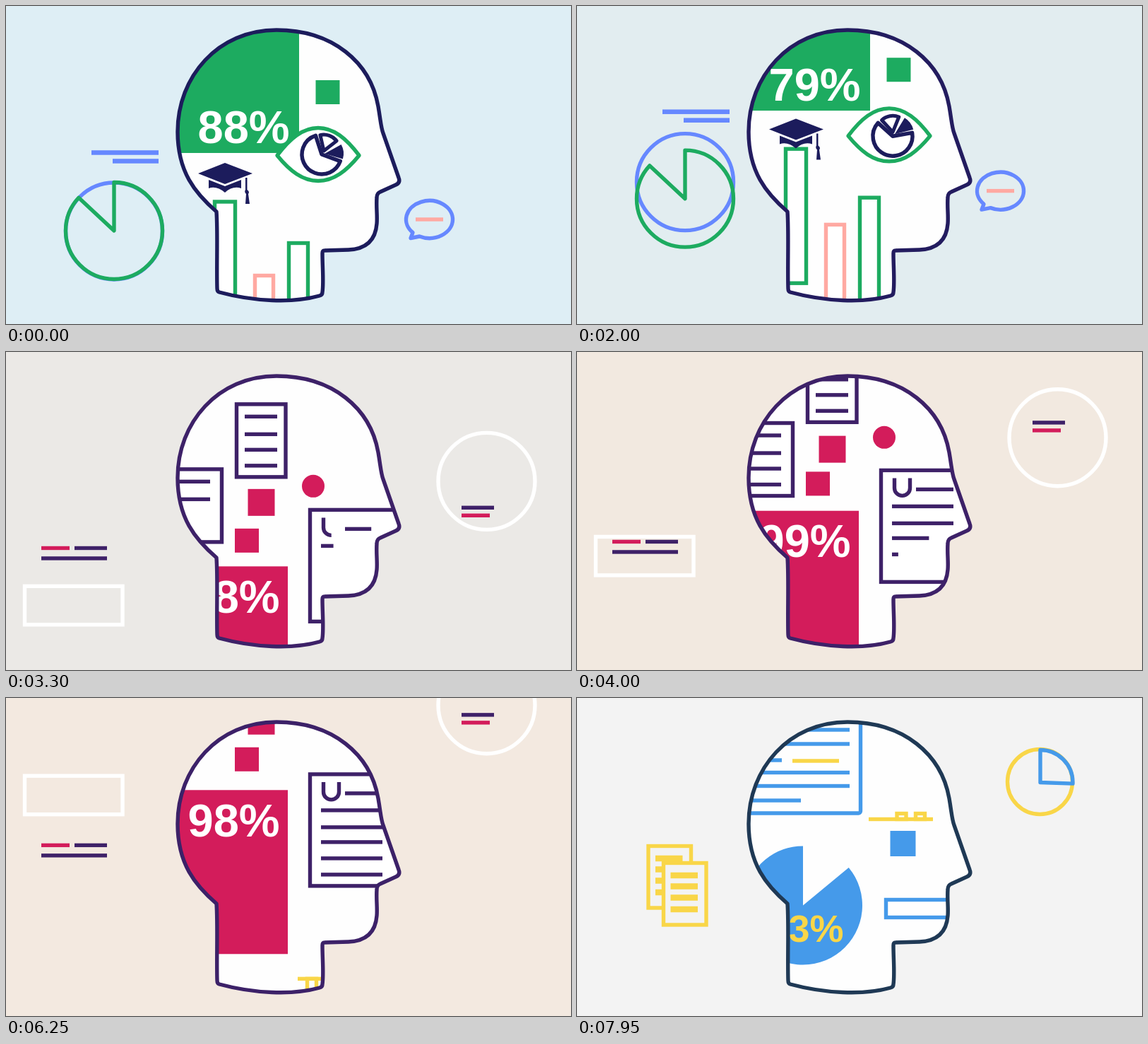
These frames come from a looping animation (800x450 px, 8000 ms). An HTML page with a canvas:

```html
<!DOCTYPE html>
<html lang="en">
<head>
<meta charset="utf-8">
<title>Head full of data</title>
<style>
  html, body { margin: 0; height: 100%; overflow: hidden; }
  canvas { display: block; width: 100vw; height: 100vh; }
</style>
</head>
<body>
<canvas width="800" height="450"></canvas>
<script>
const ctx = document.querySelector('canvas').getContext('2d');
const LOOP = 8000, WEIGHT = 5.4;
const GREEN = '#1dab60', NAVY = '#1c1c5c', SKY = '#6688ff', PINK = '#ffa9a2';
const CRIMSON = '#d31c5b', PURPLE = '#3e2168', BLUE = '#459aea', YELLOW = '#f9d648', WHITE = '#fff';
const rad = degrees => degrees * Math.PI / 180;
const clamp = v => Math.max(0, Math.min(1, v));
const ramp = (t, start, length) => clamp((t - start) / length);

// Monotone cubic interpolation through (times, values).
function track(times, values) {
  const slope = times.slice(1).map((x, i) => (values[i + 1] - values[i]) / (x - times[i]));
  const tangent = times.map((_, i) => {
    const a = slope[i - 1] ?? slope[i], b = slope[i] ?? slope[i - 1];
    return a * b > 0 ? 2 * a * b / (a + b) : 0;
  });
  return t => {
    const last = times.length - 1;
    if (t <= times[0]) return values[0];
    if (t >= times[last]) return values[last];
    const i = times.findIndex(x => x > t) - 1;
    const h = times[i + 1] - times[i], u = (t - times[i]) / h, v = 1 - u;
    return v * v * ((1 + 2 * u) * values[i] + u * h * tangent[i])
         + u * u * ((3 - 2 * u) * values[i + 1] - v * h * tangent[i + 1]);
  };
}

// Vertical motion of the three scenes: drift and leave, arrive-drift-leave, arrive.
const leaving = (a, b, c) =>
  track([0, 1100, 1750, 2600, 3300], [a, b, b + (b - a) * .59, c, c - 300]);
const passing = (a, b, c, d) =>
  track([1750, 2600, 3300, 4250, 4900, 5950, 6250, 6800, 7400],
        [a + 350, a, b, c + 12, c, c - 19, d, d - 170, d - 420]);
const arriving = (y, d) =>
  track([5950, 6250, 6850, 7500, 7950], [1.25, 1, .6, .15, 0].map(k => y + k * d));

const first = {
  tile: leaving(208, 187, 0), badge: leaving(122, 111, 0), eye: leaving(209.5, 202, 78),
  icon: leaving(210, 202, 97), cap: leaving(0, -21.5, -220), pie: leaving(318, 303, 145),
  ring: leaving(318.5, 303.5, -2), lines: leaving(207.5, 192, -40), bubble: leaving(302, 294.5, 86),
  bars: [
    { x: 295.5, w: 29, h: 190, color: GREEN, y: leaving(277, 256, -22) },
    { x: 352.5, w: 26, h: 160, color: PINK, y: leaving(381.5, 372, -2) },
    { x: 400.5, w: 27, h: 200, color: GREEN, y: leaving(335.5, 316.5, 81) }
  ],
  value: track([1750, 2500, 3100], [88, 60, 20])
};
const second = {
  sheet: passing(317, 73, -29, -120), sideSheet: passing(364.5, 166, 77.5, -60),
  news: passing(403, 223.5, 145.5, 108), video: passing(440, 213, 113.5, 33),
  badge: passing(440, 267, 161, 87), bird: passing(360, 190, 97, 10),
  tile: passing(470, 303.5, 199.5, 130.5), circle: passing(358.5, 183, 98.5, 10.5),
  frame: passing(490, 358.5, 264, 137.5), lines: passing(370, 277.5, 253.5, 208.5),
  pair: passing(480, 220.5, 70, 24),
  value: track([2600, 3300, 3900, 5950, 6250, 6900], [70, 88.5, 99, 99, 98.5, 60])
};
const third = {
  chart: arriving(171.5, 226), badge: arriving(206, 240), label: arriving(298, 200),
  page: arriving(163, 410), pie: arriving(293.5, 300), sheets: arriving(0, 300),
  ring: arriving(118.5, 420)
};
const channels = (times, colors) =>
  [0, 1, 2].map(i => track(times, colors.map(c => c[i])));
const background = channels([1300, 2600, 3300, 4600, 6250, 7700],
  [[222, 238, 245], [230, 236, 235], [235, 233, 230], [245, 233, 221], [243, 233, 224], [243, 243, 243]]);
const outline = channels([1300, 2600, 3300, 6250, 7700],
  [[28, 28, 92], [42, 29, 98], [61, 33, 104], [60, 33, 104], [31, 57, 85]]);
const colorAt = (channel, t) => `rgb(${channel.map(f => Math.round(f(t)))})`;

const HEAD = new Path2D(`M383 34C463 34 516 80 527 142C531 166 531 172 534 180L556 243Q559 250 552 253
  L530 263Q525 265 525 271C524 285 526 297 525 308C523 335 506 344 485 345L451 346Q448 346 448 350
  C448 370 450 390 448 405Q448 409 444 410C405 421 350 418 302 405Q299 404 299 400
  C298 370 300 320 298 291C268 265 243 235 243 178C243 100 300 34 383 34Z`);
const EYE = new Path2D('M-58 2C-40-22-22-37 0-37S40-22 58 2C40 24 22 38 0 38S-40 24-58 2Z');
const CAP = new Path2D(`M272 237L310 222L349 237L310 252Z
  M287 246L310 255L333 246V258Q321 254 310 264Q298 254 287 258Z
  M339 243h2.5v17q4 3 1.5 6l2 14h-6l1-14q-3-3-1-6Z`);
const BUBBLE = new Path2D('M-26.5 26.5L-23.5 18.6A33 26.5 0 1 1-14 24Z');

function stroke(color, path, width = WEIGHT) {
  ctx.strokeStyle = color;
  ctx.lineWidth = width;
  path ? ctx.stroke(path) : ctx.stroke();
}
function at(x, y, draw, angle = 0) {
  ctx.save();
  ctx.translate(x, y);
  ctx.rotate(angle);
  draw();
  ctx.restore();
}
function rect(x, y, w, h, color) {
  ctx.fillStyle = color;
  ctx.fillRect(x, y, w, h);
}
function square(x, y, size, color) {
  rect(x - size / 2, y - size / 2, size, size, color);
}
function box(x, y, w, h, color, fill) {
  if (fill) rect(x, y, w, h, fill);
  ctx.lineJoin = 'miter';
  ctx.strokeStyle = color;
  ctx.lineWidth = WEIGHT;
  ctx.strokeRect(x, y, w, h);
  ctx.lineJoin = 'round';
}
function line(x1, x2, y, color, progress = 1, width = WEIGHT) {
  rect(x1, y - width / 2, (x2 - x1) * progress, width, color);
}
function circle(x, y, r) {
  ctx.beginPath();
  ctx.arc(x, y, r, 0, 2 * Math.PI);
}
function sector(x, y, r, from, to) {
  ctx.beginPath();
  ctx.moveTo(x, y);
  ctx.arc(x, y, r, rad(from), rad(to));
  ctx.closePath();
}
function percent(value, x, y, size, color) {
  ctx.font = `bold ${size}px "Liberation Sans", Arial, sans-serif`;
  ctx.fillStyle = color;
  ctx.fillText(Math.floor(value) + '%', x, y);
}

function pieIcon() {
  sector(0, 0, 28, 20, 252);
  stroke(NAVY, null, 5.5);
  sector(3, -5, 23, -103, -38);
  stroke(NAVY, null, 5);
  sector(4, -1, 27, -29, 16);
  ctx.fillStyle = NAVY;
  ctx.fill();
}

function firstInside(t) {
  const tile = first.tile(t), eye = first.eye(t);
  rect(230, tile - 260, 185, 260, GREEN);
  percent(first.value(t), 271.5, tile - 14, 65, WHITE);
  square(455.5, first.badge(t), 34, GREEN);
  for (const bar of first.bars) box(bar.x, bar.y(t), bar.w, bar.h, bar.color, WHITE);
  at(0, first.cap(t), () => {
    ctx.fillStyle = NAVY;
    ctx.fill(CAP);
  });
  at(442, eye, () => {
    ctx.fillStyle = WHITE;
    ctx.fill(EYE);
    stroke(GREEN, EYE);
  });
  at(447, first.icon(t), pieIcon, rad(t * .165));
}

function firstOutside(t) {
  const y = first.lines(t), bubble = first.bubble(t);
  line(121, 216, y, SKY, 1, 6.5);
  line(151, 216, y + 12, SKY, 1, 6.5);
  circle(153, first.ring(t), 68.5);
  stroke(SKY);
  sector(153, first.pie(t), 68.5, -90, 223);
  stroke(GREEN);
  at(599.5, bubble, () => stroke(SKY, BUBBLE));
  line(580, 619, bubble, PINK);
}

function secondInside(t) {
  const side = second.sideSheet(t), sheet = second.sheet(t), news = second.news(t), tile = second.tile(t);
  box(200, side, 105.5, 103, PURPLE, WHITE);
  [17.5, 42.5, 64.5, 87].forEach((dy, i) =>
    line(210, 289, side + dy, PURPLE, ramp(t, 2200 + 400 * i, 600)));
  box(326.5, sheet + 1, 69.5, 103, PURPLE, WHITE);
  [18.5, 43.5, 65.5, 88].forEach((dy, i) =>
    line(338, 384, sheet + dy, PURPLE, ramp(t, 2380 + 220 * i, 220)));

  rect(200, tile, 199, 232, CRIMSON);
  percent(second.value(t), 257.5, tile + 65.5, 65, WHITE);
  square(361.5, second.video(t), 38, CRIMSON);
  square(341, second.badge(t), 34, CRIMSON);
  circle(435, second.bird(t), 16);
  ctx.fillStyle = CRIMSON;
  ctx.fill();

  box(430.5, news, 145, 158, PURPLE, WHITE);
  [27, 51, 75, 96, 119, 142].forEach((dy, i) =>
    line(i ? 446 : 480, 533, news + dy, PURPLE, ramp(t, 2950 + 250 * i, 500)));
  const drawn = ramp(t, 2950, 700);
  if (drawn) {
    ctx.beginPath();
    ctx.moveTo(449.5, news + 11);
    ctx.lineTo(449.5, news + 25);
    ctx.arc(460.5, news + 25, 11, Math.PI, 0, true);
    ctx.lineTo(471.5, news + 11);
    ctx.setLineDash([62.6 * drawn, 100]);
    stroke(PURPLE);
    ctx.setLineDash([]);
  }
}

function secondOutside(t) {
  const lines = second.lines(t), pair = second.pair(t);
  circle(680.5, second.circle(t), 68.5);
  stroke(WHITE);
  box(26.5, second.frame(t) - 27, 138.5, 54.5, WHITE);
  line(50, 90, lines, CRIMSON);
  line(97, 143, lines, PURPLE);
  line(50, 143, lines + 14.5, PURPLE);
  line(645, 691, pair, PURPLE);
  line(645, 685, pair + 11, CRIMSON);
}

function thirdInside(t) {
  const page = third.page(t), chart = third.chart(t), pie = third.pie(t);
  ctx.beginPath();
  ctx.roundRect(150, page - 150, 251.5, 150, 3);
  stroke(BLUE);
  for (const [dy, end] of [[118, 386], [98, 386], [75, 290], [57.5, 386], [38.5, 386], [18, 317]])
    line(220, end, page - dy, BLUE);
  line(305, 371, page - 74, YELLOW);

  const value = 83 * ramp(t, 6500, 1350);
  sector(320, pie, 84, -90 - value * 3.73, -90);
  ctx.fillStyle = BLUE;
  ctx.fill();
  percent(value, 269.5, pie + 51, 54, YELLOW);

  const rise = ramp(t, 6250, 1600);
  line(413, 504, chart, YELLOW);
  [0, 8, 8].forEach((height, i) => {
    const h = -30 + (30 + height) * rise;
    if (Math.abs(h) > 2) box(426.5 + 26.5 * i, chart, 13, -h, YELLOW);
  });
  square(461.5, third.badge(t), 36, BLUE);
  box(437.5, third.label(t) - 12.5, 120, 25, BLUE);
}

function thirdOutside(t, paper) {
  at(0, third.sheets(t), () => {
    for (const [x, y] of [[101, 209.5], [122.5, 233.5]]) {
      box(x, y, 60.5, 87.5, YELLOW, paper);
      [17.5, 33, 49, 65.5].forEach(dy => line(x + 10, x + 48.5, y + dy, YELLOW, 1, 8.5));
    }
  });
  const y = third.ring(t);
  circle(655.5, y, 46);
  stroke(YELLOW);
  sector(656, y + 1, 46, -90, 2);
  stroke(BLUE);
}

function render() {
  const t = performance.now() % LOOP;
  const paper = colorAt(background, t);
  const scenes = [t < 3300, t > 1750 && t < 7400, t > 5950];
  rect(0, 0, 800, 450, paper);
  ctx.lineJoin = 'round';
  if (scenes[0]) firstOutside(t);
  if (scenes[1]) secondOutside(t);
  if (scenes[2]) thirdOutside(t, paper);

  ctx.save();
  ctx.clip(HEAD);
  rect(230, 20, 340, 410, '#fefefe');
  if (scenes[0]) firstInside(t);
  if (scenes[1]) secondInside(t);
  if (scenes[2]) thirdInside(t);
  ctx.restore();
  stroke(colorAt(outline, t), HEAD);
  requestAnimationFrame(render);
}
render();
</script>
</body>
</html>
```
